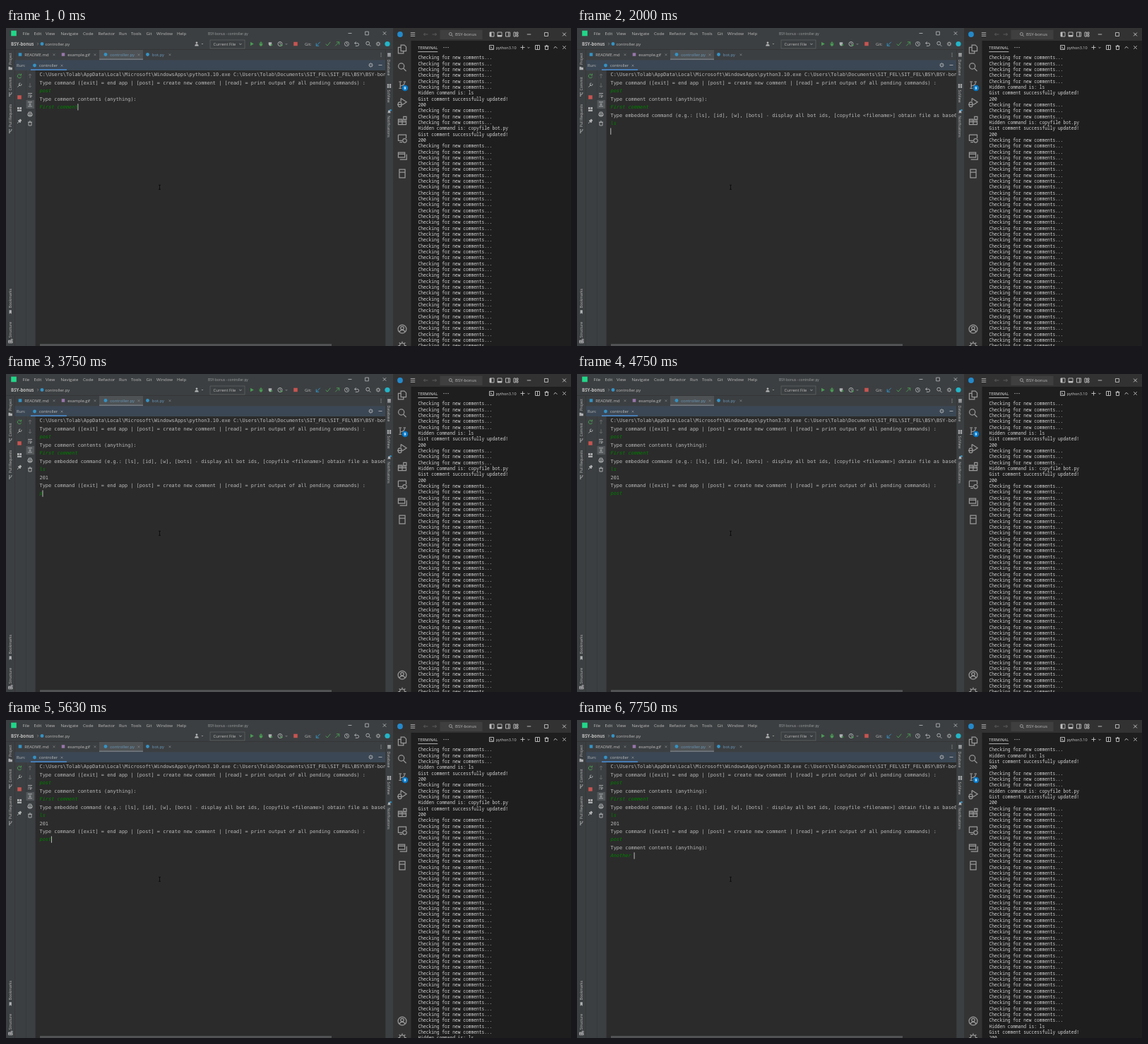
An HTML page with a canvas for the animation above (8000 ms loop, 800 by 450 pixels).

```html
<!DOCTYPE html>
<html lang="en">
<head>
<meta charset="utf-8">
<style>
html, body { margin: 0; width: 100%; height: 100%; overflow: hidden; background: #1e1e1e; }
canvas { display: block; }
</style>
</head>
<body>
<canvas id="stage" width="800" height="450"></canvas>
<script>
const LOOP = 8000;
const ctx = document.getElementById('stage').getContext('2d');
const UI = '"Open Sans", sans-serif';
const GREY = '#afb1b3', GREEN = '#499c54', RED = '#c75450', BLUE = '#3592c4', VS = '#9a9a9a';

const PROMPT = 'Type command ([exit] = end app | [post] = create new comment | [read] = print output of all pending commands) :\n>';
const CONTENTS = '\nType comment contents (anything):\n>';
const HOME = 'C:\\Users\\Tolab\\';

// Console output over time; lines starting with ">" are user input.
const feed = [
  [0, HOME + 'AppData\\Local\\Microsoft\\WindowsApps\\python3.10.exe ' + HOME +
      'Documents\\SIT_FEL\\SIT_FEL\\BSY\\BSY-bonus\\controller.py\n' + PROMPT + 'post' + CONTENTS + 'First comment'],
  [250, '\nType embedded command (e.g.: [ls], [id], [w], [bots] - display all bot ids, [copyfile <filename>] obtain file as base64)\n>'],
  [1000, 'l'], [1130, 's'], [2000, '\n'], [2130, '201\n' + PROMPT],
  [3750, 'p'], [3880, 'o'], [4000, 's'], [4130, 't'], [5880, CONTENTS],
  [7130, 'An'], [7380, 'ot'], [7500, 'h'], [7630, 'er'], [7750, ' ']
];
const caretHidden = [[750, 1000], [1630, 2000], [2630, 3250], [4750, 5250], [5750, 5880], [6380, 6880]];

// Bot log and the times at which it scrolls, in lines.
const checks = n => Array(n).fill('Checking for new comments...');
const result = command => ['Hidden command is: ' + command, 'Gist comment successfully updated!', '200'];
const log = [...checks(6), ...result('ls'), ...checks(3), ...result('copyfile bot.py'), ...checks(37), ...result('ls')];
const scrolls = [[380, 1], [5000, 1], [5500, 1], [5750, 2]];

function rect(x, y, w, h, color) {
  ctx.fillStyle = color;
  ctx.fillRect(x, y, w, h);
}

function text(str, x, y, size = 6, color = '#bbbbbb', family = UI, style = '') {
  ctx.font = `${style} ${size}px ${family}`;
  ctx.fillStyle = color;
  ctx.fillText(str, x, y);
}

function sideText(str, x, y, angle) {
  ctx.save();
  ctx.translate(x, y);
  ctx.rotate(angle * Math.PI / 180);
  ctx.textAlign = 'center';
  text(str, 0, 1.9, 5.2);
  ctx.restore();
}

function icon(x, y, path, color = GREY, scale = 1, filled = false) {
  ctx.save();
  ctx.translate(x, y);
  ctx.scale(scale, scale);
  ctx.lineWidth = 0.9 / Math.sqrt(scale);
  ctx.strokeStyle = ctx.fillStyle = color;
  ctx[filled ? 'fill' : 'stroke'](new Path2D(path));
  ctx.restore();
}
const solid = (x, y, path, color, scale) => icon(x, y, path, color, scale, true);

const I = {
  close: 'M-2-2L2 2M2-2L-2 2',
  minus: 'M-2.5 0H2.5',
  plus: 'M-3 0H3M0-3V3',
  box: 'M-2.5-2.5H2.5V2.5H-2.5Z',
  disc: 'M3 0A3 3 0 1 1-3 0A3 3 0 1 1 3 0Z',
  down: 'M-1.6-.8L0 .8L1.6-.8',
  up: 'M-2 1L0-1L2 1',
  right: 'M-.8-1.6L.8 0L-.8 1.6',
  arrowUp: 'M0 3V-3M-2-1L0-3L2-1',
  arrowDown: 'M0-3V3M-2 1L0 3L2 1',
  arrowLeft: 'M3 0H-3M-1-2L-3 0L-1 2',
  arrowRight: 'M-3 0H3M1-2L3 0L1 2',
  diagonal: 'M2.5-2.5L-2.5 2.5M-2.5-1V2.5H1',
  check: 'M-3 0L-1 2.3L3-2.5',
  play: 'M-2-3L3 0L-2 3Z',
  search: 'M1.5-.8A2.2 2.2 0 1 1-2.9-.8A2.2 2.2 0 1 1 1.5-.8M.9 .9L3 3',
  gear: 'M1.9 0A1.9 1.9 0 1 1-1.9 0A1.9 1.9 0 1 1 1.9 0M0-3.2V-2M0 2V3.2M-3.2 0H-2M2 0H3.2M-2.3-2.3L-1.4-1.4M1.4 1.4L2.3 2.3M-2.3 2.3L-1.4 1.4M1.4-1.4L2.3-2.3',
  clock: 'M3 0A3 3 0 1 1-3 0A3 3 0 1 1 3 0M0-2V0L1.5 1',
  undo: 'M-2.5-1H1A1.8 1.8 0 0 1 1 2.6H-1.5M-.8-2.8L-2.6-1L-.8 .8',
  rerun: 'M2.6 .8A2.7 2.7 0 1 1 1.5-2.2M2.6-3.4V-1H.2',
  user: 'M1.4-1.6A1.4 1.4 0 1 1-1.4-1.6A1.4 1.4 0 1 1 1.4-1.6M-2.7 3A2.7 2.7 0 0 1 2.7 3Z',
  bug: 'M-1.8-1H1.8V1.5A1.8 1.8 0 0 1-1.8 1.5ZM-1.3-1.6A1.3 1.3 0 0 1 1.3-1.6ZM-3-1H3V-.5H-3ZM-3 1H3V1.5H-3Z',
  shield: 'M-2.5-2.5H2.5V.5Q2 2.5 0 3.2Q-2 2.5-2.5 .5Z',
  wrench: 'M-2.6 2.6L.6-.6M2.8-2A1.8 1.8 0 1 1 1.4-3',
  pin: 'M-3 3L-.6 .6M-2-.8L1 2L1.6 .2L3-1.2L1.2-3L-.2-1.4Z',
  trash: 'M-2-1.5H2V3H-2ZM-3-1.8H3M-1-3H1',
  printer: 'M-3-1H3V2H-3ZM-1.8-1V-3H1.8V-1M-1.8 1H1.8V3H-1.8Z',
  wrap: 'M-3-2.5H3M-3 0H1.6A1.3 1.3 0 0 1 1.6 2.4H0M1 1.2L-.2 2.4L1 3.6M-3 2.5H-1.6',
  toEnd: 'M-3-3H3M0-2V1.5M-1.6 0L0 1.5L1.6 0M-3 3H3',
  folder: 'M-3-2.4H-.5L.3-1.5H3V2.4H-3Z',
  bookmark: 'M-1.8-3H1.8V3L0 1.4L-1.8 3Z',
  branch: 'M-1.5-1.7V2M1.8-1.8Q1.8 .5-1.5 .7M-2.5-2.4H-.5M.9-2.4H2.7M-2.5 2.6H-.5',
  bell: 'M-2.8 2H2.8L1.8 .8V-.8A1.8 1.8 0 0 0-1.8-.8V.8ZM-.7 2.6H.7',
  files: 'M-1-3.2H1.6L3-1.8V1.4H-1ZM-1-1.4H-3V3.2H1V1.4',
  debug: 'M-1-3.2L3.3-.4L.3 1.6M-1-3.2V-.8M-3.1 1A1.3 1.3 0 0 1-.5 1V2A1.3 1.3 0 0 1-3.1 2ZM-3.8 1.5H.2',
  blocks: 'M-3-1H0V3H-3ZM-3 1H3V3H0M3 3V0H-3M1-3H3.2V-.9H1Z',
  screen: 'M-3-2.6H3V0M0 1.8H-3V-2.6M-2 3H0M3.4 1.8A1.5 1.5 0 1 1 .4 1.8A1.5 1.5 0 1 1 3.4 1.8',
  windows: 'M-3-2.6H2V1.2H-3ZM-1.8 2.8H3.4V-1.2M-3-1.4H2',
  book: 'M-2.2-3.2H2.2V3.2H-2.2ZM-2.2-1H2.2'
};

const dot = (x, y, color, scale = 0.8) => solid(x, y, I.disc, color, scale);

function drawIdeFrame() {
  rect(0, 0, 548, 450, '#3c3f41');
  rect(42, 60, 495, 390, '#2b2b2b');
  rect(0, 30, 547, 0.7, '#323232');
  rect(12, 31, 0.6, 419, '#323232');
  rect(537, 31, 0.6, 419, '#323232');
  rect(41.4, 60, 0.6, 390, '#323232');

  // Title bar and menu
  solid(11, 7.5, 'M-4-4H4V4H-4Z', '#21d789', 0.95);
  const menu = { File: 23.5, Edit: 39.5, View: 56, Navigate: 77.5, Code: 109, Refactor: 130.5, Run: 160, Tools: 177, Git: 198.5, Window: 213, Help: 242 };
  for (const name in menu) text(name, menu[name], 9.8, 6.1);
  text('BSY-bonus - controller.py', 286, 9.6, 4.85, '#a0a2a4');
  icon(487, 7.5, I.minus, GREY);
  icon(511, 7.5, I.box, GREY, 0.95);
  icon(536, 7.5, I.close, GREY, 1.1);

  // Breadcrumb and toolbar
  text('BSY-bonus', 7, 24.7, 6.2, '#bbbbbb', UI, 'bold');
  icon(45, 22.5, I.right, '#7d8082');
  dot(51, 22.5, BLUE);
  text('controller.py', 55.5, 24.7, 5.9);
  solid(270, 22.5, I.user, GREY);
  icon(278, 22.5, I.down, GREY, 0.7);
  ctx.strokeStyle = '#626566';
  ctx.lineWidth = 0.7;
  ctx.strokeRect(289, 17, 49, 12);
  text('Current File', 293.5, 24.8, 5.9);
  icon(332, 22.8, I.down);
  solid(348, 22.5, I.play, GREEN, 0.95);
  solid(361, 22.5, I.bug, GREEN);
  solid(374, 22.5, I.shield, GREY, 0.9);
  solid(376, 24, I.play, GREEN, 0.6);
  icon(388, 22.5, I.clock);
  solid(390.5, 24.5, I.play, GREEN, 0.55);
  icon(397, 22.8, I.down, GREY, 0.7);
  solid(410, 22.5, I.box, RED, 1.1);
  text('Git:', 423, 24.8);
  icon(442, 22.5, I.diagonal, BLUE, 1.1);
  icon(456, 22.5, I.check, GREEN, 1.1);
  icon(469, 22.5, 'M-2.5 2.5L2.5-2.5M-1-2.5H2.5V1', GREEN, 1.1);
  icon(482.5, 22.5, I.clock);
  icon(496.5, 22.5, I.undo, GREY, 1.1);
  icon(513, 22.5, I.search, GREY, 1.1);
  icon(527, 22.5, I.gear);
  dot(540, 22.5, '#23b5c8', 1.2);

  // Editor tabs
  rect(132, 31, 62, 14, '#4e5254');
  rect(132, 43.5, 62, 1.8, '#747a80');
  const tabs = [['README.md', 20, 68, '#bbbbbb', BLUE], ['example.gif', 81, 126, '#bbbbbb', '#9876aa'],
    ['controller.py', 141, 188, '#6897bb', BLUE], ['bot.py', 200.5, 232, '#6897bb', BLUE]];
  for (const [name, x, closeX, color, mark] of tabs) {
    if (name.endsWith('py')) dot(x, 37.5, mark);
    else solid(x, 37.5, I.box, mark, 0.9);
    text(name, x + 6.3, 39.8, 5.9, color);
    icon(closeX, 37.8, I.close, '#7d8082', 0.7);
  }
  for (const y of [35.3, 37.5, 39.7]) rect(530.5, y, 1, 1, GREY);

  // Run panel header
  rect(12.6, 45.3, 524.4, 14.7, '#3b4754');
  rect(35, 58.3, 51, 1.7, '#4a88c7');
  text('Run:', 15, 55.2, 5.8);
  dot(40.5, 53, BLUE);
  text('controller', 47, 55.2, 5.8);
  icon(79, 53.2, I.close, '#8d9094', 0.7);
  icon(516.5, 52.5, I.gear);
  icon(530, 52.5, I.minus);

  // Run panel buttons
  rect(28, 60, 0.6, 390, '#34373a');
  icon(19, 68, I.rerun, GREEN);
  icon(19, 81, I.wrench);
  solid(19, 98, I.box, RED, 1.1);
  solid(19, 115, 'M-3-3H-.4V0H-3ZM.4-3H3V0H.4ZM-3 .8H3V3H-3Z', GREY);
  solid(19, 132, I.pin, GREY);
  icon(19, 132, I.pin);
  rect(28.5, 102, 11.5, 12, '#54585a');
  icon(34, 68, I.arrowUp, '#6a6d6f');
  icon(34, 81, I.arrowDown, '#6a6d6f');
  icon(34, 95, I.wrap);
  icon(34, 107.8, I.toEnd);
  icon(34, 122, I.printer);
  icon(34, 135, I.trash);

  // Side strips
  const left = [['Project', 43.5, 57, I.folder], ['Commit', 79, 94, I.branch], ['Pull Requests', 124, 146, I.branch],
    ['Bookmarks', 382.5, 402, I.bookmark], ['Structure', 427, 443, I.blocks]];
  for (const [name, y, iconY, shape] of left) {
    sideText(name, 6.2, y, -90);
    (shape === I.folder || shape === I.bookmark ? solid : icon)(6.2, iconY, shape, GREY, 0.9);
  }
  const right = [['Database', 56, 38, 'M-2.6-2.8H2.6V-1.2H-2.6ZM-2.6-.7H2.6V.8H-2.6ZM-2.6 1.3H2.6V2.9H-2.6Z'],
    ['SciView', 96.5, 82, 'M-3-3H-.4V-.4H-3ZM.4-3H3V-.4H.4ZM-3 .4H-.4V3H-3ZM.4 .4H3V3H.4Z'], ['Notifications', 139.5, 118.5, I.bell]];
  for (const [name, y, iconY, shape] of right) {
    sideText(name, 542, y, 90);
    solid(542.5, iconY, shape, GREY, 0.9);
  }
  dot(544.5, 116.3, BLUE, 0.45);
}

function drawCodeFrame() {
  rect(548, 0, 252, 450, '#1e1e1e');
  rect(548, 0, 252, 18, '#323233');
  rect(548, 18, 25.5, 432, '#333333');

  // Title bar
  dot(558, 9, '#2489ca', 1.3);
  icon(576, 9, 'M-3.2-2.4H3.2M-3.2 0H3.2M-3.2 2.4H3.2', '#b4b4b4');
  icon(594.5, 9, I.arrowLeft, '#5f5f5f');
  icon(606.5, 9, I.arrowRight, '#5f5f5f');
  rect(614.5, 2.7, 60, 13.3, '#3f3f40');
  icon(630, 9.2, I.search, '#a8a8a8', 0.9);
  text('BSY-bonus', 636, 11.3, 6, '#b8b8b8');
  const pane = 'M-3-3H3V3H-3Z';
  icon(688, 9, pane + 'M-1-3V3', '#c0c0c0');
  rect(685, 6, 2, 6, '#c0c0c0');
  icon(699, 9, pane, '#c0c0c0');
  rect(696, 10, 6, 2, '#c0c0c0');
  icon(710.5, 9, pane + 'M1-3V3', '#c0c0c0');
  icon(722, 9, 'M-3-3H-.6V3H-3ZM.8-3H3V-.6H.8ZM.8 .8H3V3H.8Z', '#c0c0c0');
  icon(740.5, 9, I.minus, '#c0c0c0', 1.1);
  icon(765, 9, I.box, '#c0c0c0');
  icon(790.5, 9, I.close, '#c0c0c0', 1.2);

  // Activity bar
  const bar = [[30, I.files], [55.5, I.search], [80.5, I.branch], [105.5, I.debug], [131, I.blocks],
    [156, I.screen], [181, I.windows], [206, I.book], [449.5, I.gear]];
  for (const [y, shape] of bar) icon(561, y, shape, VS, 1.85);
  icon(561, 426, 'M3.2 0A3.2 3.2 0 1 1-3.2 0A3.2 3.2 0 1 1 3.2 0M1.2-.8A1.2 1.2 0 1 1-1.2-.8A1.2 1.2 0 1 1 1.2-.8M-2.1 2.3A2.2 2.2 0 0 1 2.1 2.3', VS, 1.85);
  dot(565, 85, '#007acc', 1.4);
  text('9', 563.5, 87, 5, '#ffffff', UI, 'bold');

  // Panel header
  text('TERMINAL', 583.3, 29.7, 5.8, '#e7e7e7');
  rect(583.3, 33.3, 28, 0.8, '#d8d8d8');
  for (const x of [619.5, 622.5, 625.5]) rect(x, 27, 1.1, 1.1, '#c5c5c5');
  icon(687.5, 27.5, 'M-3-3H3V3H-3ZM-1.7-1.4L0 0L-1.7 1.4M.3 1.6H2', '#c5c5c5');
  text('python3.10', 693.7, 29.7, 5.5, '#cccccc');
  icon(731.5, 27.5, I.plus, '#c5c5c5');
  icon(740, 27.8, I.down, '#c5c5c5', 0.9);
  icon(752.5, 27.5, pane + 'M0-3V3', '#c5c5c5');
  icon(765.5, 27.5, I.trash, '#c5c5c5');
  icon(778, 27.5, I.up, '#c5c5c5', 1.2);
  icon(790.5, 27.5, I.close, '#c5c5c5', 1.1);
}

function drawConsole(t) {
  const lines = feed.filter(([at]) => t >= at).map(([, str]) => str).join('').split('\n');
  const left = 47.5, top = 68.4, step = 11.45, advance = 4.16;
  ctx.save();
  ctx.beginPath();
  ctx.rect(42, 60, 495, 390);
  ctx.clip();
  lines.forEach((line, i) => {
    const typed = line[0] === '>';
    text(typed ? line.slice(1) : line, left, top + i * step, 6.91, typed ? '#007f00' : '#bbbbbb',
      '"DejaVu Sans Mono", monospace', typed ? 'italic' : '');
  });
  const last = lines.length - 1;
  if (!caretHidden.some(([from, to]) => t >= from && t < to)) {
    rect(left + lines[last].replace('>', '').length * advance - 0.2, top + last * step - 7, 1, 9.3, '#bbbbbb');
  }
  ctx.restore();
  rect(48, 447, 413, 3, '#505254');
  icon(217.5, 225.3, 'M-1.5-3H1.5M0-3V3M-1.5 3H1.5', '#0c0c0c');
}

function drawLog(t) {
  const first = scrolls.reduce((sum, [at, n]) => sum + (t >= at ? n : 0), 0);
  log.slice(first, first + 50).forEach((line, i) =>
    text(line, 583.5, 44.3 + i * 8.325, 6.25, '#d4d4d4', '"Noto Sans Mono", monospace'));
}

function frame() {
  const t = performance.now() % LOOP;
  drawIdeFrame();
  drawCodeFrame();
  drawConsole(t);
  drawLog(t);
  requestAnimationFrame(frame);
}
frame();
</script>
</body>
</html>
```
